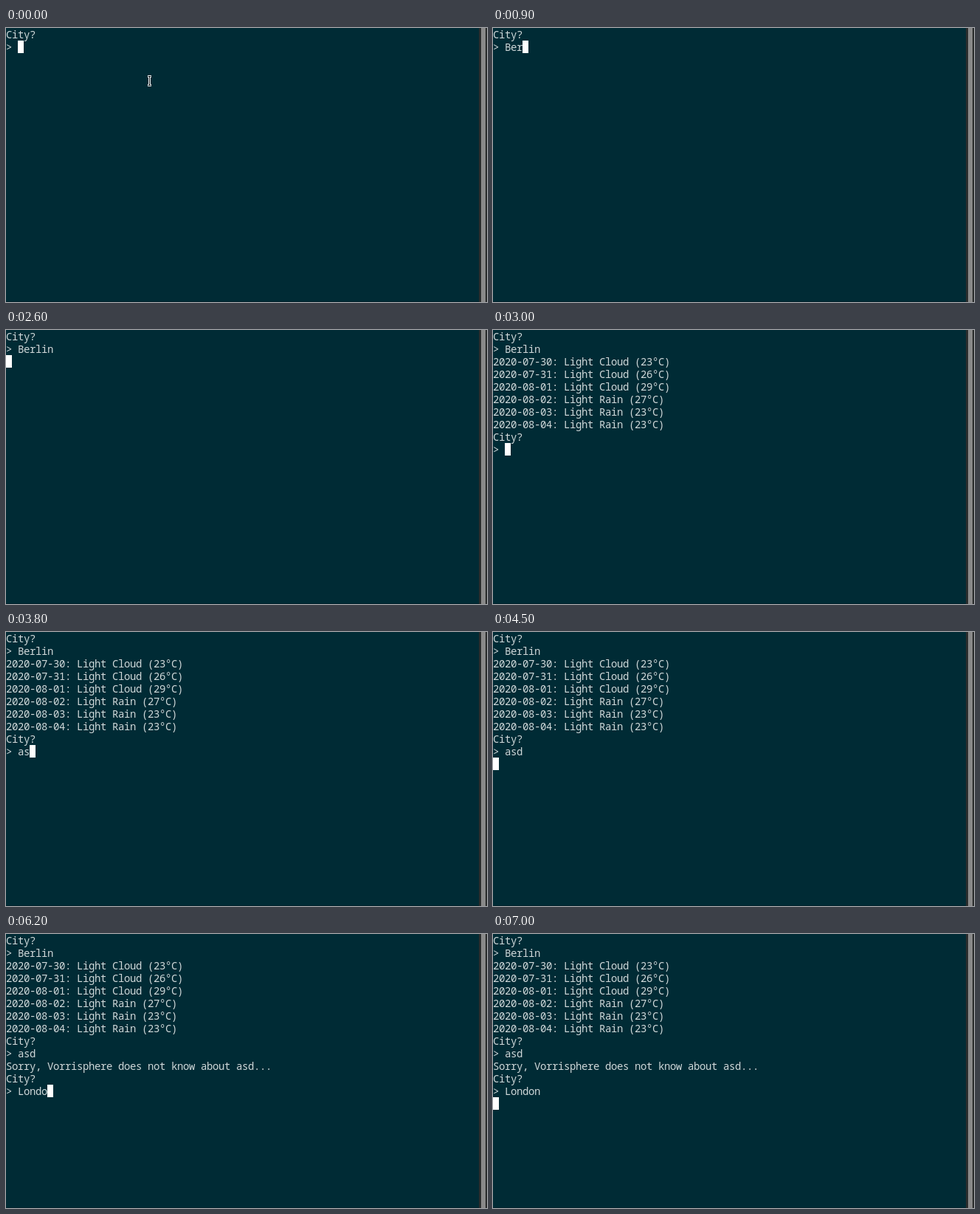
Animation of 652x371 px, one loop 8 s. Source, as an HTML page:

```html
<!DOCTYPE html>
<html lang="en">
<head>
<meta charset="utf-8">
<title>Weather prompt</title>
<style>
  html, body { margin: 0; width: 100%; height: 100%; overflow: hidden; background: #002b35; }
  #stage { position: relative; width: 652px; height: 371px; overflow: hidden; background: #002b35; }
  #screen {
    position: absolute; left: 0; top: 0; margin: 0;
    font: 14px/17px "Noto Sans Mono", "DejaVu Sans Mono", monospace;
    letter-spacing: calc(8px - 1ch);
    font-variant-ligatures: none;
    color: #d0d8d9; white-space: pre;
  }
  #cursor { position: absolute; left: 0; top: 0; width: 8px; height: 17px; background: #fff; }
  #pointer { position: absolute; left: 191px; top: 63px; }
  #edge { position: absolute; left: 0; bottom: 0; width: 642px; height: 1px; background: #02222b; }
  #bar { position: absolute; left: 641px; top: 0; width: 11px; height: 371px; background: #292c2c; }
  #bar::after { content: ""; position: absolute; left: 3px; top: 0; width: 6px; height: 100%; background: #898989; }
</style>
</head>
<body>
<div id="stage">
  <pre id="screen"></pre>
  <div id="cursor"></div>
  <svg id="pointer" width="8" height="18" viewBox="0 0 8 18" fill="none">
    <path id="beam" d="M1 2.5H3.5V14.5H1M6 2.5H3.5V14.5H6" stroke="#fff" stroke-width="3"/>
    <path d="M1.5 2.5H5.5M3.5 2.5V14.5M1.5 14.5H5.5" stroke="#10191c" stroke-width="1"/>
  </svg>
  <div id="edge"></div>
  <div id="bar"></div>
</div>
<script>
const LOOP = 8000, CELL_W = 8, CELL_H = 17, POINTER_HIDES = 500;
const PROMPT = "City?\n> ";

const forecast = [
  "2020-07-30: Light Cloud (23°C)",
  "2020-07-31: Light Cloud (26°C)",
  "2020-08-01: Light Cloud (29°C)",
  "2020-08-02: Light Rain (27°C)",
  "2020-08-03: Light Rain (23°C)",
  "2020-08-04: Light Rain (23°C)"
].join("\n") + "\n";

// [time in ms, appended output, cursor hidden]
const steps = [
  [0, PROMPT],
  [200, "", true],
  [400, ""],
  [700, "B"],
  [900, "er"],
  [1100, "li"],
  [1400, "n"],
  [2000, "\n"],
  [2500, "", true],
  [2600, ""],
  [3000, forecast + PROMPT],
  [3200, "", true],
  [3700, "a"],
  [3800, "s"],
  [4000, "d"],
  [4500, "\n"],
  [4800, "Sorry, Vorrisphere does not know about asd...\n" + PROMPT],
  [5400, "", true],
  [5800, "L"],
  [6000, "o"],
  [6100, "n"],
  [6200, "do"],
  [6300, "n"],
  [6900, "", true],
  [7000, "\n"]
];

const [screenEl, cursorEl, pointerEl] =
  ["screen", "cursor", "pointer"].map(id => document.getElementById(id));
const show = (el, on) => { el.style.visibility = on ? "visible" : "hidden"; };
let shownText = null;

function render(time) {
  const past = steps.filter(([at]) => at <= time);
  const text = past.map(step => step[1]).join("");
  if (text !== shownText) {
    screenEl.textContent = shownText = text;
    const lines = text.split("\n");
    const x = lines.at(-1).length * CELL_W, y = (lines.length - 1) * CELL_H;
    cursorEl.style.transform = `translate(${x}px, ${y}px)`;
  }
  show(cursorEl, !past.at(-1)[2]);
  show(pointerEl, time < POINTER_HIDES);
}

const start = performance.now();
function tick() {
  render((performance.now() - start) % LOOP);
  requestAnimationFrame(tick);
}
tick();
</script>
</body>
</html>
```
